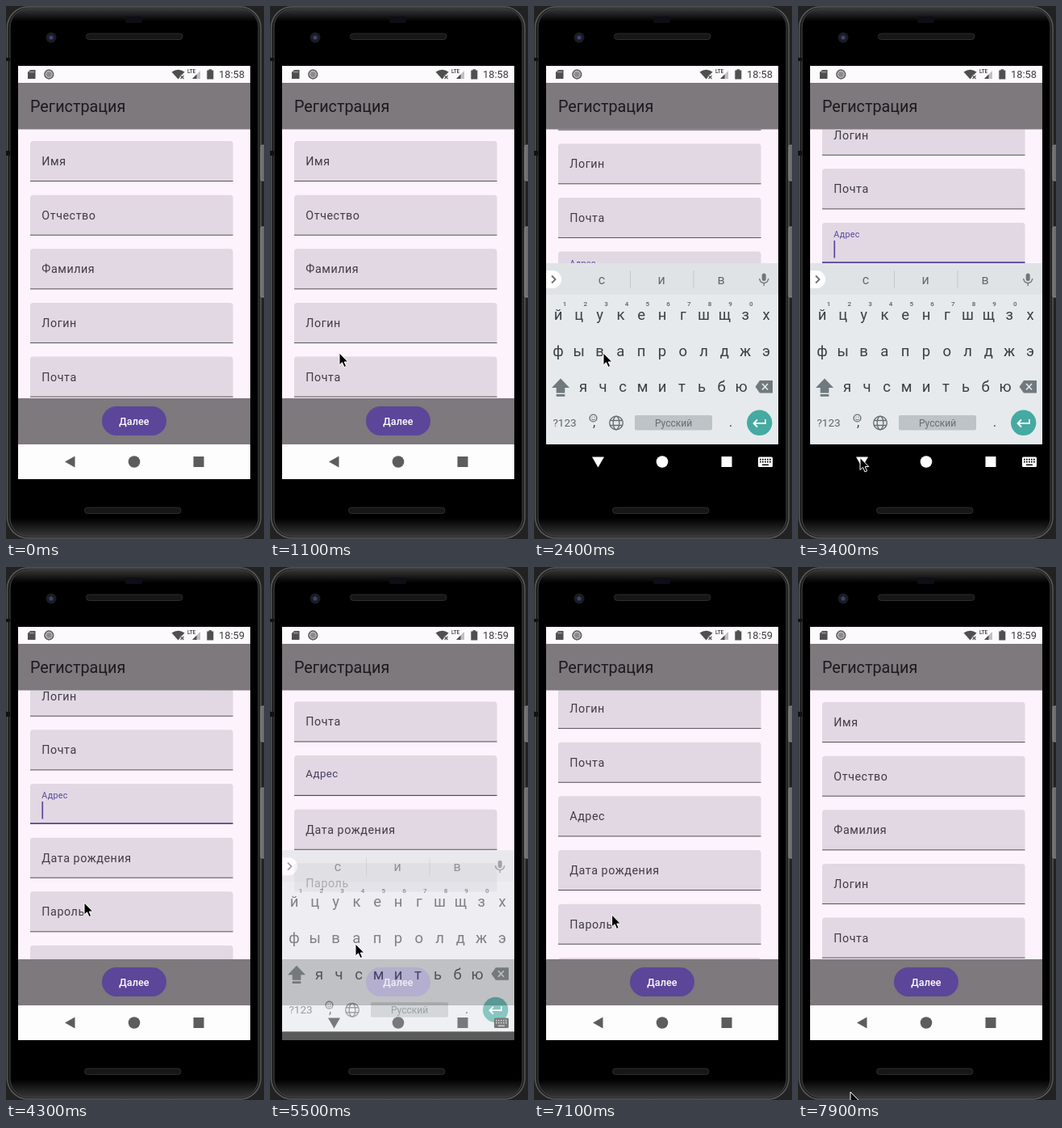
Recreate the animation shown at these times as an HTML page. Size 320x659 px, loop 8 s.

```html
<!DOCTYPE html>
<html lang="ru">
<head>
<meta charset="utf-8">
<title>Регистрация</title>
<style>
html, body { margin: 0; width: 100%; height: 100%; overflow: hidden; background: #222; }
svg { display: block; width: 100%; height: 100%; font-family: Roboto, "Noto Sans", sans-serif; }
.mid { text-anchor: middle; }
</style>
</head>
<body>
<svg viewBox="0 0 320 659" xmlns="http://www.w3.org/2000/svg">
  <defs>
    <clipPath id="screenClip"><rect x="15" y="74" width="288" height="511"/></clipPath>
    <clipPath id="listClip"><rect id="viewport" x="15" y="152" width="288"/></clipPath>
    <linearGradient id="bevel" x2="0" y2="1">
      <stop offset="0" stop-color="#383838"/><stop offset=".025" stop-color="#000"/>
      <stop offset=".965" stop-color="#000"/><stop offset="1" stop-color="#383838"/>
    </linearGradient>
  </defs>

  <!-- phone body -->
  <rect width="320" height="659" fill="#222"/>
  <rect x="1.500" y="1" width="314.500" height="657" rx="26" fill="#1c1c1c" stroke="#5a5a5a" stroke-width="1.500"/>
  <rect x="5" y="3" width="308" height="653" rx="23" fill="url(#bevel)" stroke="#444"/>
  <g fill="#6e6e6e" stroke="#999" stroke-width=".8">
    <rect x="316" y="172" width="5" height="44" rx="1.500"/>
    <rect x="316" y="273" width="5" height="87" rx="1.500"/>
  </g>
  <g fill="#111"><rect y="179" width="5" height="6"/><rect y="64" width="5" height="4"/></g>
  <rect x="148" y="13" width="21" height="8" rx="2" fill="#0e0e16"/>
  <circle cx="56" cy="39" r="6.500" fill="#1b1c22"/>
  <circle cx="56" cy="39" r="2.600" fill="#3a4270"/>
  <g fill="#171717" stroke="#2d2d2d">
    <rect x="99.500" y="34" width="119.500" height="7.500" rx="3.700"/>
    <rect x="97.500" y="620" width="119.500" height="7.500" rx="3.700"/>
  </g>

  <g clip-path="url(#screenClip)">
    <rect x="15" y="73" width="289" height="512" fill="#fdf3fc"/>
    <g clip-path="url(#listClip)"><g id="fields"></g></g>

    <!-- status bar -->
    <rect x="15" y="73" width="289" height="22" fill="#fdfafd"/>
    <g fill="#4f4f4f">
      <path d="M30 79H36.500V90H27V82Z"/>
      <path d="M205.500 81.500Q213.500 76 221.500 81.500L213.500 90.500Z"/>
      <path d="M231 90L241 80V90Z" opacity=".35"/>
      <path d="M231 90L236.500 84.500V90Z"/>
      <path d="M251.500 79.500V78.300H255V79.500H257.300V90.500H249.300V79.500Z"/>
    </g>
    <path d="M30 80.500v2M32 80.500v2M34 80.500v2" stroke="#fdfafd" stroke-width=".7"/>
    <circle cx="53.300" cy="84.500" r="5.400" fill="#bbb" stroke="#5a5a5a" stroke-width="1.500"/>
    <circle cx="53.300" cy="84.500" r="3.200" fill="#8a8a8a"/>
    <path d="M216.500 86l4 4m0-4l-4 4" stroke="#fdfafd" stroke-width="3"/>
    <path d="M216.500 86l4 4m0-4l-4 4" stroke="#4f4f4f" stroke-width="1.100"/>
    <text x="225" y="82.700" font-size="6.300" font-weight="500" fill="#333">LTE</text>
    <text id="clock" x="264" y="89.300" font-size="12.800" fill="#3c3c3c"></text>

    <!-- top and bottom bars -->
    <rect x="15" y="95" width="289" height="57.500" fill="#7d797d"/>
    <text x="30" y="131" font-size="19.800" fill="#1c1a1e">Регистрация</text>
    <rect x="15" y="485" width="289" height="57.500" fill="#7d797d"/>
    <rect x="119" y="495" width="80" height="36" rx="18" fill="#5c4699"/>
    <text class="mid" x="159" y="517.700" font-size="12.500" font-weight="500" letter-spacing=".1" fill="#fff">Далее</text>
    <rect x="15" y="542" width="289" height="43" fill="#fefdfe"/>

    <g id="keyboard">
      <rect x="15" y="542" width="289" height="160" fill="#000"/>
      <rect x="15" y="318" width="289" height="224" fill="#e6eaed"/>
      <rect x="15" y="318" width="289" height="39" fill="#dfe3e6"/>
      <path d="M15 327H23A11 11 0 0 1 23 349H15Z" fill="#fff"/>
      <path d="M22 333.500l4.500 4.500-4.500 4.500" fill="none" stroke="#6a7074" stroke-width="1.800"/>
      <path d="M119.500 327V349M198 327V349" stroke="#c3c8cb"/>
      <rect x="282.700" y="330.500" width="5" height="9.500" rx="2.500" fill="#70777b"/>
      <path d="M279.700 337a5.500 5.500 0 0 0 11 0M285.200 342.500V346" fill="none" stroke="#70777b" stroke-width="1.400"/>
      <path d="M33 460.500L44 472H38.300V478.500H27.700V472H22Z" fill="#70797d"/>
      <rect x="27.700" y="480" width="10.600" height="2.800" fill="#70797d"/>
      <path d="M280 463H296V478.500H280L274.500 470.700Z" fill="#70797d"/>
      <path d="M283 467l7 7.500m0-7.500l-7 7.500" stroke="#e6eaed" stroke-width="1.600"/>
      <g fill="none" stroke="#687074" stroke-width="1.400">
        <circle cx="73.500" cy="509.500" r="4.400"/>
        <path d="M71.300 510.500q2.200 2.500 4.400 0M72 507.500v1.200M75 507.500v1.200" stroke-width="1.100"/>
        <circle cx="102" cy="515.500" r="8.300"/>
        <ellipse cx="102" cy="515.500" rx="3.800" ry="8.300"/>
        <path d="M94 512.500H110M94 518.500H110"/>
      </g>
      <rect x="125" y="506" width="96" height="18.500" rx="2" fill="#bdc3c6"/>
      <circle cx="279.700" cy="515.300" r="15.700" fill="#45aaa1"/>
      <path d="M287 511V516H273M277 511.500L272.500 516L277 520.500" fill="none" stroke="#fff" stroke-width="1.800"/>
      <g id="keys"></g>
    </g>

    <g id="nav">
      <path id="back"/>
      <circle cx="159" cy="563.500" r="7.300"/>
      <rect x="232.500" y="557" width="13" height="13"/>
      <g id="switcher">
        <rect x="278" y="557.500" width="18" height="12.500" rx="1.500" stroke="none"/>
        <path d="M280 560.700H294M280 563.700H294" stroke-width="1.700" stroke-dasharray="1.700 1.300"/>
        <path d="M283 567.300H291" stroke-width="1.500"/>
      </g>
    </g>
  </g>
  <path id="cursor" d="M0 0V15L3.500 11.800 6 17.500 8.600 16.400 6.200 11H10.800Z" stroke="#fff"/>
</svg>

<script>
const LOOP = 8000, STEP = 100;
const TOP = 167, PITCH = 66.65, HEIGHT = 50;
const LIST_TOP = 152, LIST_END = 485, KEYBOARD_TOP = 318;
const LABELS = ["Имя", "Отчество", "Фамилия", "Логин", "Почта", "Адрес", "Дата рождения", "Пароль", "Повтор пароля"];
const ADDRESS = 5, REPEAT = 8;

// When each field is tapped, and when the keyboard is dismissed.
const TAP_ADDRESS = 2000, HIDE_FIRST = 3700, TAP_REPEAT = 5400, HIDE_SECOND = 6500;
const RISE = 200, TRAVEL = 600;

const STOPS = [
  { x: -12, y: 470, at: 0 },
  { x: 86, y: 429, at: 900 },
  { x: 77, y: 558.5, at: 3400 },
  { x: 97, y: 415, at: 4300 },
  { x: 106, y: 466, at: 5300 },
  { x: 77, y: 569, at: 6400 },
  { x: 98, y: 420, at: 7200 },
  { x: 65, y: 649, at: 7900 }
];

const $ = id => document.getElementById(id);
const mix = (a, b, k) => a + (b - a) * k;
const progress = (t, from, to) => Math.min(1, Math.max(0, (t - from) / (to - from)));
const smooth = (t, from, to) => (1 - Math.cos(progress(t, from, to) * Math.PI)) / 2;
const rise = (t, from) => Math.sin(progress(t, from, from + RISE) * Math.PI / 2);
const reveal = (field, bottom) => TOP + field * PITCH + HEIGHT - bottom;
const blend = (a, b, k) => `rgb(${a.map((v, i) => Math.round(mix(v, b[i], k)))})`;

function set(el, attrs) {
  for (const name in attrs) el.setAttribute(name, attrs[name]);
}
function add(parent, tag, attrs, text = "") {
  const el = document.createElementNS("http://www.w3.org/2000/svg", tag);
  set(el, attrs);
  el.textContent = text;
  return parent.appendChild(el);
}

function keyboardAt(t) {
  return rise(t, TAP_ADDRESS) - rise(t, HIDE_FIRST) + rise(t, TAP_REPEAT) - rise(t, HIDE_SECOND);
}
function focusAt(t, field) {
  if (field === ADDRESS) return rise(t, TAP_ADDRESS) - rise(t, TAP_REPEAT);
  return field === REPEAT ? rise(t, TAP_REPEAT) : 0;
}
function scrollAt(t) {
  const end = reveal(REPEAT, LIST_END - 2);
  let y = 0;
  const glide = (to, from, until) => { y = mix(y, to, smooth(t, from, until)); };
  glide(90, 1100, 1700);
  glide(reveal(ADDRESS, KEYBOARD_TOP), TAP_ADDRESS + RISE, 2500);
  glide(end, 4600, 5000);
  glide(reveal(REPEAT, KEYBOARD_TOP), TAP_REPEAT + RISE, 6000);
  glide(end, HIDE_SECOND + 100, HIDE_SECOND + RISE);
  glide(0, 6900, 7600);
  return y;
}
function cursorAt(t) {
  let { x, y } = STOPS[0];
  for (const stop of STOPS.slice(1)) {
    const k = smooth(t, stop.at - TRAVEL, stop.at);
    x = mix(x, stop.x, k);
    y = mix(y, stop.y, k);
  }
  return { x, y };
}

function buildKeys() {
  const key = (s, x, y, size = 18.5, fill = "#3a4044", weight = 400) =>
    add($("keys"), "text", { x, y, class: "mid", "font-size": size, "font-weight": weight, fill }, s);
  const row = (letters, x, y, gap, ...look) => [...letters].forEach((s, i) => key(s, x + i * gap, y, ...look));
  row("йцукенгшщзх", 30, 387.5, 25.8);
  row("фывапролджэ", 30, 433, 25.8);
  row("ячсмитьбю", 61, 477.3, 24.5);
  row("1234567890", 38, 371, 25.7, 8, "#585f63", 500);
  row("сив", 84, 343.5, 74, 16, "#646b6f");
  key("?123", 38, 520, 13.5, "#5c6468");
  key(",", 74.5, 520, 16);
  key(".", 244, 520, 17);
  key("Русский", 173, 519.7, 12, "#666d71");
}

const fields = LABELS.map((text, i) => {
  const y = TOP + i * PITCH, g = $("fields");
  add(g, "path", { d: `M30 ${y + HEIGHT}v-46.400q0-3.600 3.600-3.600h244.300q3.600 0 3.600 3.600v46.400Z`, fill: "#e1d8e3" });
  return {
    y,
    line: add(g, "rect", { x: 30, width: 251.5 }),
    label: add(g, "text", { x: 44.3 }, text),
    caret: add(g, "rect", { x: 44.4, y: y + 22, width: 1.7, height: 21.5, fill: "#5b479b" })
  };
});

function drawField(f, focus, caretOn) {
  const thick = mix(.9, 1.8, focus);
  set(f.label, {
    y: f.y + mix(30, 18.3, focus),
    "font-size": mix(14.3, 10.7, focus),
    "letter-spacing": mix(.56, .36, focus),
    fill: blend([64, 59, 69], [86, 70, 160], focus)
  });
  set(f.line, { y: f.y + HEIGHT - thick, height: thick, fill: blend([73, 69, 79], [91, 71, 155], focus) });
  set(f.caret, { opacity: caretOn ? 1 : 0 });
}

function draw(t) {
  const shown = keyboardAt(t), { x, y } = cursorAt(t);
  const focusedSince = RISE + (t < TAP_REPEAT ? TAP_ADDRESS : TAP_REPEAT);
  const blink = (t - focusedSince) % 1000 < 500;

  set($("fields"), { transform: `translate(0 ${-scrollAt(t)})` });
  set($("viewport"), { height: mix(LIST_END, KEYBOARD_TOP, shown ** 2) - LIST_TOP });
  fields.forEach((f, i) => {
    const focus = focusAt(t, i);
    drawField(f, focus, focus === 1 && blink);
  });
  set($("keyboard"), { opacity: shown ** 1.3, transform: `translate(0 ${(1 - shown) * 110})` });
  set($("nav"), { fill: blend([92, 92, 92], [255, 255, 255], shown ** 5) });
  set($("back"), { d: shown > 0 ? "M72 557.500H87L79.500 570.500Z" : "M85.500 556.500V570.500L73 563.500Z" });
  set($("switcher"), { opacity: shown > 0 ? 1 : 0, stroke: shown === 1 ? "#000" : "#ccc" });
  $("clock").textContent = t < HIDE_FIRST + RISE ? "18:58" : "18:59";
  set($("cursor"), { transform: `translate(${x} ${y})` });
}

buildKeys();
const begin = performance.now();
function tick() {
  const t = (performance.now() - begin) % LOOP;
  draw(Math.floor(t / STEP) * STEP);
  requestAnimationFrame(tick);
}
tick();
</script>
</body>
</html>
```
